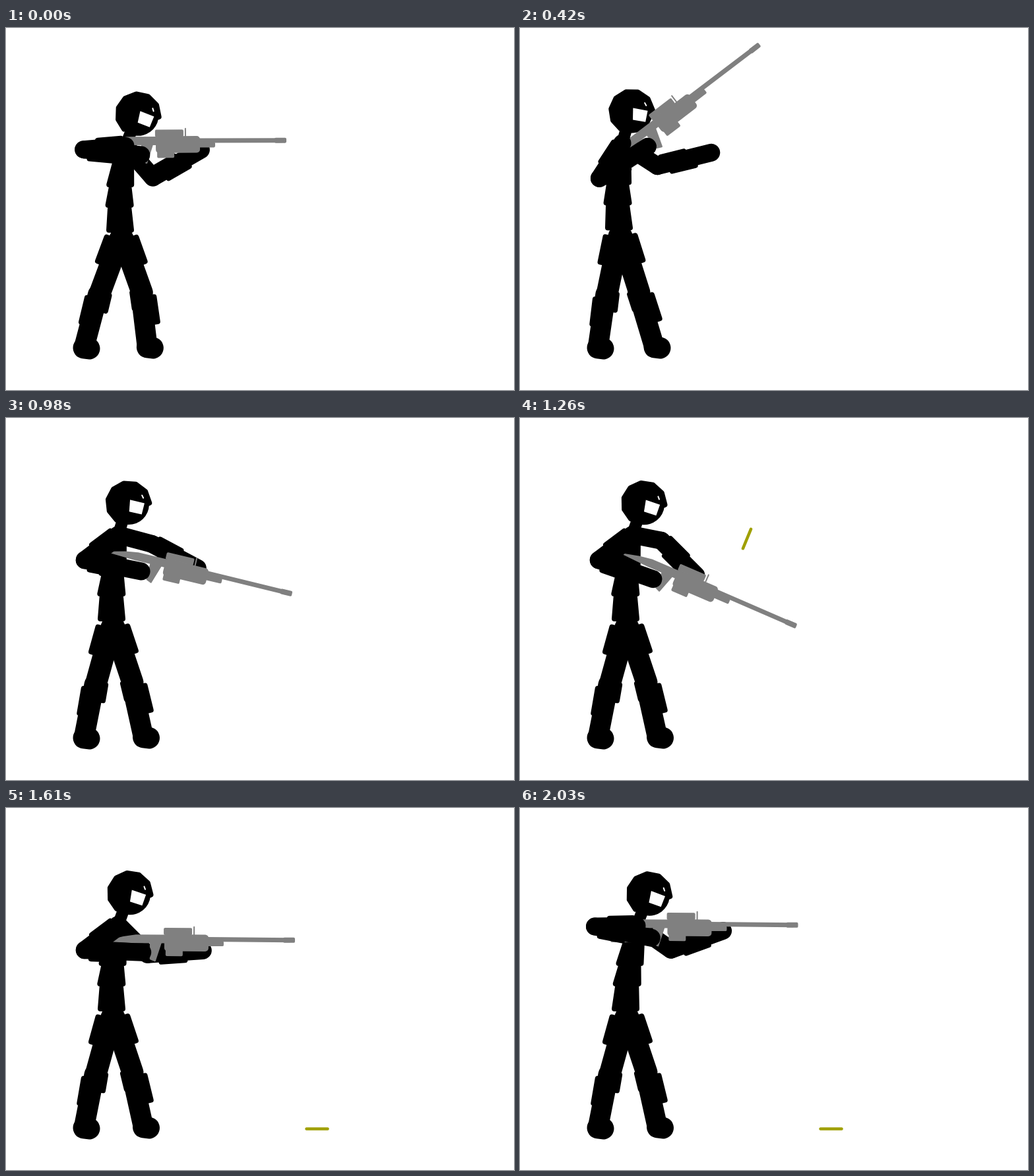
An HTML page with a canvas that plays this animation: 770 px wide and 550 px high, repeating every 2.1 s.

```html
<!DOCTYPE html>
<html lang="en">
<head>
<meta charset="utf-8">
<title>Stick figure with rifle</title>
<style>
html, body { margin: 0; width: 100%; height: 100%; overflow: hidden; background: #fff; }
canvas { display: block; }
</style>
</head>
<body>
<canvas id="stage" width="770" height="550"></canvas>
<script>
const ctx = document.getElementById('stage').getContext('2d');
const STEP = 70, STEPS = 30, RAD = Math.PI / 180;
const UPPER_ARM = 63.5, NEAR_FOREARM = 87.5, FAR_FOREARM = 84;
ctx.lineCap = ctx.lineJoin = 'round';

// Each key states only what changes. Angles are in degrees:
// near = upper arm, farUp / farLow = far arm, aim = rifle, at gunX, gunY.
const keys = [];
const key = (step, change, ease = k => k) =>
  keys.push({ step, ease, pose: { ...keys.at(-1)?.pose, ...change } });

key(0, { lean: 13, bow: 6, nod: 9, near: 175, farUp: 49, farLow: -30, gunX: 227, gunY: 172, aim: -0.4 });
key(6, { lean: -10, bow: 3, nod: -2, near: 123, farUp: 33, farLow: -14, gunX: 206, gunY: 145.5, aim: -37.5 },
  k => Math.sin(k * Math.PI / 2));
key(10, { lean: 0, bow: 2, nod: 0, near: 132, farUp: 30, farLow: -25, gunX: 225, gunY: 164, aim: -19.4 },
  k => k ** 3.5);
key(14, { bow: 8, nod: 1, near: 143, farUp: 15, farLow: 28, gunX: 241, gunY: 221, aim: 13.5 });
key(18, { nod: 6, farUp: 11, farLow: 45, gunX: 237, gunY: 238, aim: 23.3 });
key(23, { farUp: 45, farLow: -4, gunX: 240, gunY: 199.5, aim: 0.4 });
key(29, { bow: 15, nod: 8, near: 179, farUp: 35, farLow: -20, gunX: 223.5, gunY: 176.5 });

const off = ([x, y], dx, dy) => [x + dx, y + dy];
const polar = (p, deg, r) => off(p, r * Math.cos(deg * RAD), r * Math.sin(deg * RAD));
const heading = (a, b) => Math.atan2(b[1] - a[1], b[0] - a[0]) / RAD;

function poseAt(step) {
  const i = Math.max(1, keys.findIndex(k => k.step >= step));
  const a = keys[i - 1], b = keys[i];
  const k = b.ease((step - a.step) / (b.step - a.step));
  const pose = {};
  for (const name in a.pose) pose[name] = a.pose[name] + (b.pose[name] - a.pose[name]) * k;
  return pose;
}

// The feet stay put; knees and spine follow the hip, hands follow the rifle.
function skeleton({ lean, bow, nod, near, farUp, farLow, gunX, gunY, aim }) {
  const hip = [162 + lean, 318 + 0.15 * lean];
  const shoulder = off(hip, bow, 0.2 * bow - 142);
  const gun = [gunX, gunY];
  const grip = polar(polar(gun, aim, -29), aim + 90, 20);
  const elbowA = polar(shoulder, near, UPPER_ARM);
  const dip = Math.max(0, aim);
  const elbowB = polar(shoulder, farUp, UPPER_ARM - 0.8 * dip);
  return {
    hip, shoulder, gun, aim, nod, elbowA, elbowB,
    kneeL: [136 + 0.42 * lean, 405], kneeR: [192 + 1.1 * lean, 402],
    footL: [122, 486.5], footR: [212.5 + 0.45 * lean, 485.5],
    waist: off(hip, 0.35 * bow - 5, -48),
    chest: off(hip, 0.7 * bow - 6, -80),
    head: off(shoulder, 14.5 + 0.45 * nod, -47.5),
    handA: polar(elbowA, heading(elbowA, grip), NEAR_FOREARM),
    handB: polar(elbowB, farLow, FAR_FOREARM - 0.4 * dip)
  };
}

function paint(color) {
  ctx.fillStyle = ctx.strokeStyle = color;
}

function poly(points, width = 8) {
  ctx.beginPath();
  points.forEach(p => ctx.lineTo(...p));
  ctx.closePath();
  ctx.fill();
  if (width) {
    ctx.lineWidth = width;
    ctx.stroke();
  }
}

function line(a, b, width) {
  ctx.lineWidth = width;
  ctx.beginPath();
  ctx.moveTo(...a);
  ctx.lineTo(...b);
  ctx.stroke();
}

function box(x, y, w, h, r = 2) {
  ctx.beginPath();
  ctx.roundRect(x, y, w, h, r);
  ctx.fill();
}

function local([x, y], deg, draw) {
  ctx.save();
  ctx.translate(x, y);
  ctx.rotate(deg * RAD);
  draw();
  ctx.restore();
}

// armour on one side of the bone a-b
const pad = (a, b, from, to, reach) => local(a, heading(a, b), () =>
  poly([[from, 0], [from, reach], [to, reach], [to, 0]]));

// torso section, given half widths at both ends
const band = (a, b, wa, wb) =>
  poly([off(a, -wa, 0), off(a, wa, 0), off(b, wb, 0), off(b, -wb, 0)]);

function leg(hip, knee, foot, side) {
  line(hip, knee, 33);
  pad(hip, knee, 5, 44, 20 * side);
  line(off(knee, -2, 0), off(foot, -4, 0), 31);
  pad(knee, foot, 9, 47, 17 * side);
  pad(knee, foot, -2, 22, -15 * side);
  line(off(foot, -4, -0.5), off(foot, 4, 0.5), 33);
}

function torso(s) {
  band(s.waist, off(s.hip, -2, -13), 14, 17);
  band(s.chest, off(s.waist, 0, -3), 13, 17.5);
  band(s.shoulder, off(s.chest, 0, -2), 9, 17);
  line(s.shoulder, s.head, 18);
}

function head(s) {
  local(s.head, s.nod, () => {
    ctx.beginPath();
    ctx.arc(1, 1, 31, 0, 7);
    ctx.fill();
    poly(Array.from({ length: 8 }, (_, i) => polar([0, 0], 124 + 33.3 * i, 30 + i / 3)));
    paint('#fff');
    poly([[3, -6], [25, -1], [21, 16], [2, 12]], 0);
    line([21, -13], [23, -9], 2);
    paint('#000');
  });
}

function farArm(s) {
  line(s.shoulder, s.elbowB, 27);
  line(s.elbowB, s.handB, 27);
  pad(s.elbowB, s.handB, 8, 44, -12);
  pad(s.elbowB, s.handB, 20, 56, 13);
}

function nearArm(s) {
  line(s.shoulder, s.elbowA, 27);
  pad(s.shoulder, s.elbowA, 6, 41, 12);
  pad(s.shoulder, s.elbowA, 8, 50, -12);
  line(s.elbowA, s.handA, 27);
  pad(s.elbowA, s.handA, 10, 45, 13);
}

function rifle(s, firing) {
  local(s.gun, s.aim, () => {
    if (firing) {
      paint('#ff0');
      poly([[200, 0], [226, -12], [301, 0], [226, 12]], 2);
    }
    paint('#808080');
    poly([[-86, 3], [-62, -3], [-43, -6], [2, -6], [2, 5], [-45, 5]], 2);
    line([-84, 26], [-28, 26], 4);
    poly([[-21, 5], [-5, 5], [-14, 33], [-21, 30]], 2);
    box(-1, -17.5, 43, 11);
    box(0, -7.5, 67, 25.5, 5);
    box(2, 12, 26, 13.5);
    box(62, 2, 28, 8);
    box(180, -4, 18, 8);
    line([45, -19], [45, -7], 2);
    line([64, -0.5], [190, 0], 7);
    paint('#000');
  });
}

// ejected case: a parabola, then at rest
function shell(step) {
  if (step < 17) return;
  const u = Math.min(step - 18, 5);
  paint('#a0a000');
  local([344 + 25.5 * u, 183.5 - 32.7 * u + 18.7 * u * u], -13.5 * (5 - u),
    () => line([-16, 0], [16, 0], 4.5));
}

function render(now) {
  const step = Math.floor(now / STEP) % STEPS;
  const s = skeleton(poseAt(step));
  paint('#fff');
  ctx.fillRect(0, 0, 770, 550);
  paint('#000');
  farArm(s);
  leg(off(s.hip, -2, 0), s.kneeL, s.footL, 1);
  leg(off(s.hip, 2, 0), s.kneeR, s.footR, -1);
  torso(s);
  head(s);
  rifle(s, step === 1);
  nearArm(s);
  shell(step);
}

const start = performance.now();
function tick() {
  render(performance.now() - start);
  requestAnimationFrame(tick);
}
tick();
</script>
</body>
</html>
```
